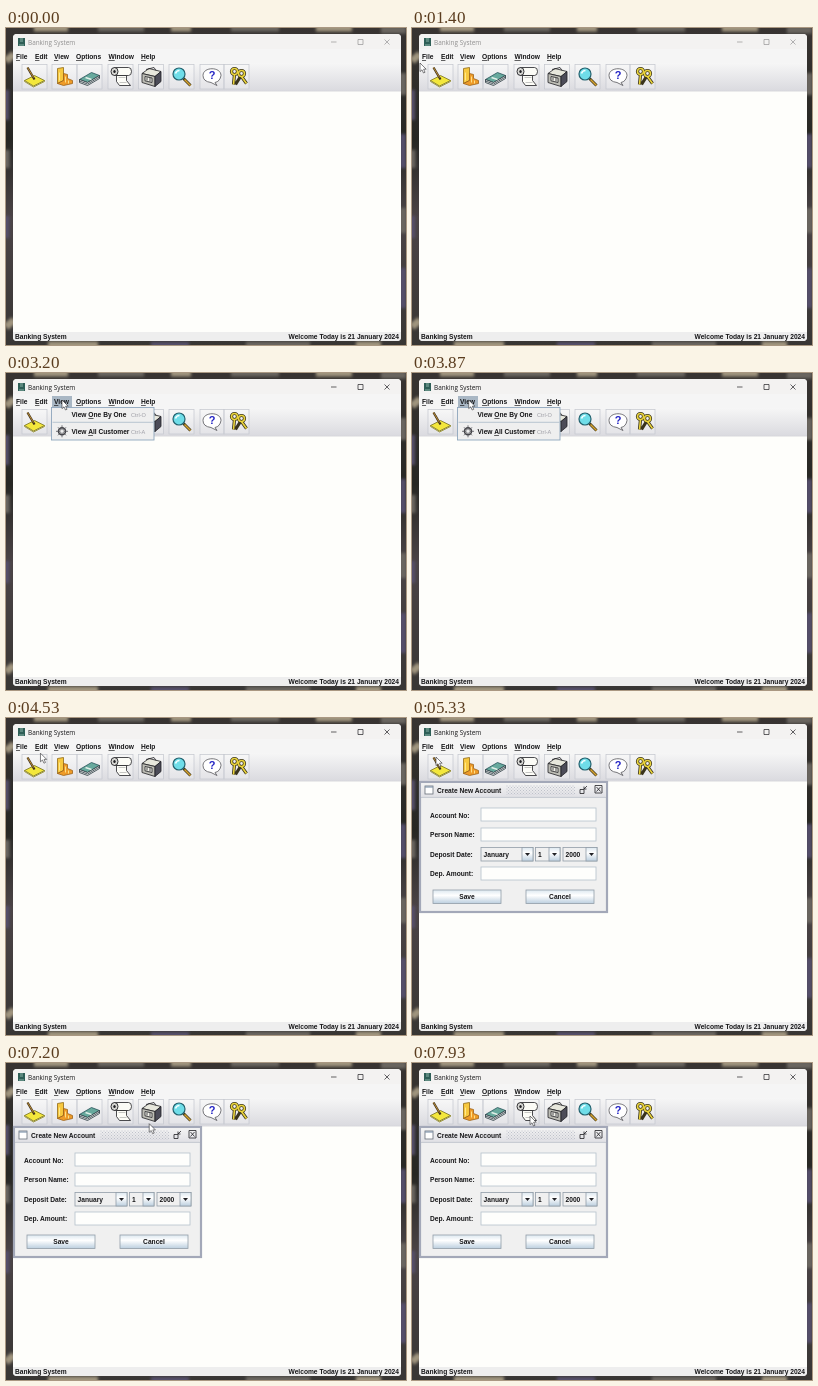
These frames come from a looping animation (400 by 317 pixels, 8 s). An HTML page:

```html
<!DOCTYPE html>
<html lang="en">
<head>
<meta charset="utf-8">
<title>Banking System</title>
<style>
html, body { margin: 0; width: 100%; height: 100%; overflow: hidden; background: #2f2d2c; }
svg { display: block; width: 100%; height: 100%; }
text { font: bold 6.65px "Liberation Sans", Arial, sans-serif; fill: #161618; white-space: pre; }
.cap { font: 6.4px "Open Sans", "Noto Sans", sans-serif; }
.key { font-weight: normal; font-size: 5.6px; fill: #9c9ca4; }
.u { text-decoration: underline; text-decoration-thickness: .6px; }
</style>
</head>
<body>
<svg id="stage" viewBox="0 0 400 317">
  <defs>
    <linearGradient id="bar" x2="0" y2="1">
      <stop stop-color="#f6f6f6"/><stop offset="1" stop-color="#dadadf"/>
    </linearGradient>
    <linearGradient id="btn" x2="0" y2="1">
      <stop stop-color="#dde8f0"/><stop offset=".4" stop-color="#fff"/><stop offset="1" stop-color="#bccfdf"/>
    </linearGradient>
    <linearGradient id="calm" x2="0" y2="1">
      <stop stop-color="#f3f3f3"/><stop offset="1" stop-color="#e0e0e5"/>
    </linearGradient>
    <linearGradient id="lively" x2="0" y2="1">
      <stop stop-color="#f0f4fb"/><stop offset="1" stop-color="#cbdaec"/>
    </linearGradient>
    <linearGradient id="wall" x2="0" y2="1">
      <stop stop-color="#383432"/><stop offset=".35" stop-color="#272723"/>
      <stop offset=".6" stop-color="#4b4446"/><stop offset="1" stop-color="#383634"/>
    </linearGradient>
    <pattern id="bumps" width="3" height="3" patternUnits="userSpaceOnUse">
      <path d="M0 .5h1M1.5 2h1" stroke="#b4b8c2" stroke-width=".8"/>
    </pattern>
    <filter id="soft"><feGaussianBlur stdDeviation="1.5"/></filter>
  </defs>
  <rect width="400" height="317" fill="url(#wall)"/>
  <g id="desk" filter="url(#soft)"></g>
  <g id="app"></g>
  <g id="dialog"></g>
  <g id="edit"></g>
  <g id="view"></g>
  <path id="mouse" d="M0 0V8.6L2 6.8 3.5 10 5 9.3 3.6 6.2H6.2Z" fill="#fff" stroke="#2e2e32" stroke-width=".6"/>
</svg>
<script>
const LOOP = 8000;
const INK = "#202024", EDGE = "#929da9";
const $ = id => document.getElementById(id);
const rect = (x, y, w, h, fill, stroke = "none", more = "") =>
  `<rect x="${x}" y="${y}" width="${w}" height="${h}" fill="${fill}" stroke="${stroke}" ${more}/>`;
const path = (d, stroke = INK, fill = "none", width = .8) =>
  `<path d="${d}" stroke="${stroke}" fill="${fill}" stroke-width="${width}"/>`;
// "_" before a letter underlines it
const text = (x, y, s, more = "") =>
  `<text x="${x}" y="${y}" ${more}>${s.replace(/_(.)/, '<tspan class="u">$1</tspan>')}</text>`;
const at = (x, y, s) => `<g transform="translate(${x} ${y})">${s}</g>`;

// Blurred wallpaper around the window
$("desk").innerHTML =
  path("M28 0H62M165 0H185M310 0H346M0 33 8 26M0 299 8 292M42 317H92M350 317H375", "#a0957f", "none", 7) +
  path("M92 0H138M225 0H273M375 2H400M0 122V140M397 45V67M397 180V205M240 317H304", "#6b6660", "none", 7) +
  path("M0 62V92M0 188V210M397 106V140M397 240V280M145 317H183", "#55506a", "none", 6);

// Toolbar pictures, drawn around their own centre
const icons = [
  [28.5, path("M-10 4 0-1 10 4-1 9.5Z", "#77701c", "#f3e73c") + path("M-10 4v1L-1 10.5 10 5V4", "#8d861b") +
    path("M-7-9 0 3", "#3f301c", "none", 2.2) + path("M-7-9-1 1", "#dda63a")],
  [58.5, path("M-7-8-1-9V4L-7 7Z", "#916a17", "#f7c83f") + path("M-1-3 3-2V2L8 4V7L-1 9-7 7-1 4Z", "#9d6218", "#ee9b28") +
    path("M-5-4v8M1 0v6M4 4v3", "#fff0a0")],
  [83.5, path("M-10 3 2-4 10-1-2 6Z", "#27545a", "#67a99d") + path("M-10 3V6L-2 9 10 2V-1L-2 6Z", "#24343c", "#f4f4ee") +
    path("M-10 4.5-2 7.5 10 .5", "#2a3a48") + path("M-4 1 2 3", "#e0efe8", "none", 1.6)],
  [114.5, path("M-6-9H8Q11-9 11-5Q11-1 8-1H-6Z", INK, "#fbfbf6") + path("M-4-1V5L-1 9H10L6 4V-1Z", INK, "#fdfdf8") +
    `<ellipse cx="-6" cy="-5" rx="3.5" ry="4" fill="#d8d8d4" stroke="${INK}" stroke-width=".9"/>` +
    `<ellipse cx="-6" cy="-5" rx="1.2" ry="1.6" fill="${INK}"/>` + path("M-2 1H5M-1 6H6", "#b9b9b6")],
  [145, path("M-9-3-2-8 10-5 4 0Z", INK, "#e7e7dc") + path("M-9-3 4 0V10L-9 6Z", INK, "#bdbdb5") +
    path("M4 0 10-5V5L4 10Z", INK, "#4c4c58") + path("M-6 0 1 1.5V6L-6 4.3Z", INK, "#f4f4ec") +
    path("M-4 1V4M-1 1.5V5M-5-7 3-9 5-6", INK)],
  [175.5, path("M2 2 9 9", "#453b1c", "none", 3) + path("M3 3 9 9", "#d9a52e", "none", 1.4) +
    '<circle cx="-2.5" cy="-2.5" r="6" fill="#6fdde8" stroke="#22616e" stroke-width="1.2"/>' +
    path("M-6-3Q-5-6-2-6", "#f2ffff", "none", 1.6)],
  [206, path("M-1 6Q-9 5-9-1C-9-10 9-10 9-1Q8 5 3 6L5 9Z", "#55555a", "#fff") +
    text(0, 2.5, "?", 'text-anchor="middle" style="font-size:11px;fill:#2424c4"')],
  [231.5, '<g fill="none" stroke="#3a341c" stroke-width="3.2"><circle cx="-3" cy="-5" r="3"/><circle cx="4" cy="-3" r="3"/><path d="M-3-2-4 8M3 0-2 8M4 0 9 7"/></g>' +
    '<g fill="none" stroke="#ead43c" stroke-width="1.6"><circle cx="-3" cy="-5" r="3"/><circle cx="4" cy="-3" r="3"/><path d="M-3-2-4 8M4 0 9 7"/></g>']
];
const buttons = [[16, 25], [46, 25], [71, 25], [102, 25], [132.5, 25], [163, 25], [194, 24], [218, 25]];
const menus = [[10, "_File"], [29, "_Edit"], [48, "_View"], [70, "_Options"], [102.5, "_Window"], [135, "_Help"]];

$("app").innerHTML =
  rect(7, 6, 388, 307, "#fefefb", "none", 'rx="4"') +
  path("M7 21V10Q7 6 11 6H391Q395 6 395 10V21Z", "none", "#f3f2f1") +
  rect(7, 21, 388, 14, "#f5f5f5") +
  rect(7, 35, 388, 28, "url(#bar)") +
  path("M7 63.2H395", "#cfcfd4", "none", .6) +
  rect(12, 10, 7, 8, "#2f5f57") + path("M14 11h3M14 13h3M13 17h5", "#a2c8bb") +
  '<g id="caption">' + text(22, 16.7, "Banking System", 'class="cap"') +
  `<path d="M325 14h5.5M352 11.5h5v5h-5ZM378.5 11.5l5 5m0-5-5 5" fill="none" stroke="${INK}" stroke-width=".7"/></g>` +
  rect(26, 23, 19, 11.5, "#a9b7c4", "none", 'id="editTab"') +
  rect(46, 23, 20, 11.5, "#a9b7c4", "none", 'id="viewTab"') +
  menus.map(m => text(m[0], 31, m[1])).join("") +
  buttons.map(([x, w]) => rect(x, 36.5, w, 24.5, "#fff", "#c4c7ce", 'fill-opacity=".2" stroke-width=".7"')).join("") +
  icons.map(([x, s]) => at(x, 48.5, s)).join("") +
  path("M7 304H395V309Q395 313 391 313H11Q7 313 7 309Z", "none", "#eeeeee") +
  text(9, 311, "Banking System") +
  text(393, 311, "Welcome Today is 21 January 2024", 'text-anchor="end"');

function popup(x, y, h, rows, lines) {
  return rect(x, y, 102.5, h, "#efefef", "#8fa6bd", 'stroke-width=".9"') +
    lines.map(l => path(`M${x + 1} ${l}h101`, "#a3b4c5", "none", .7)).join("") +
    rows.map(([row, label, key, kx]) =>
      text(x + 20, row, label) + text(kx, row - .3, key, 'class="key"')).join("");
}
const trash = path("M-3-3H3L2 5H-2ZM-4-4H4M-1-5H1M-1-1V4M1-1V4", "#424246", "#cacacb");
const glasses = path("M-6 5-3-5H-1V4ZM6 5 3-5H1V4ZM-1-1H1", "#1c1c20", "#2a2a2e", 1) +
  path("M-4.5 4-2.5 4M2.5 4 4.5 4", "#a5a5a8");
const gear = '<circle r="3.5" fill="#d9d9d9" stroke="#424246" stroke-width="1.5"/>' +
  path("M-6 0H6M0-6V6M-4-4 4 4M-4 4 4-4", "#525258") + '<circle r="1.5" fill="#efefef"/>';
$("edit").innerHTML = popup(25.5, 34.5, 75.5, [
  [44.2, "Depos_it Money", "Ctrl-T", 102], [56.7, "_Withdraw Money", "Ctrl-W", 102],
  [73, "_Delete Customer", "Ctrl-D", 102.5], [91.5, "_Search By No.", "Ctrl-S", 102],
  [105.5, "Search By Na_me", "Ctrl-M", 102]
], [61.2, 79.5]) + at(36, 70, trash) + at(36, 89, glasses);
$("view").innerHTML = popup(45.5, 34.5, 32.5, [
  [44.2, "View _One By One", "Ctrl-O", 125], [61, "View _All Customer", "Ctrl-A", 125]
], [49.3]) + at(56, 58.3, gear);

const thin = 'stroke-width=".8"';
const field = y => rect(69, y, 115, 13, "#fefefc", "#b5c0cb", thin);
const combo = (x, w, s) => rect(x, 129.5, w, 13.5, "#f0f0f0", EDGE, thin) +
  rect(x + w - 11, 129.5, 11, 13.5, "url(#btn)", EDGE, thin) +
  path(`M${x + w - 8} 135h5l-2.5 3Z`, "none", INK) + text(x + 2.5, 138.7, s);
const push = (x, s) => rect(x, 172, 68, 13.5, "url(#btn)", EDGE, thin) +
  text(x + 34, 181.4, s, 'text-anchor="middle"');
$("dialog").innerHTML =
  rect(8, 64, 187, 130, "#f0f0f0", "none", 'id="frame" stroke-width="2.2"') +
  rect(9.2, 65.2, 184.6, 14, "url(#calm)", "none", 'id="head"') + rect(94, 67, 69, 10, "url(#bumps)") +
  path("M9 79.4H194", "#b3b9c4", "none", .7) +
  rect(13, 68, 8, 8, "#fff", "#666e78", thin) + path("M13 69H21", "#8498ad", "none", 1.2) +
  text(25, 74.6, "Create New Account") +
  path("M168 71.5h4v4h-4ZM175 68l-3 3m0-2.5V71h2.5") +
  path("M183 67.5h7v7.5h-7ZM184.5 69l4 4.5m0-4.5-4 4.5") +
  [[99.5, "Account No:"], [119, "Person Name:"], [138.7, "Deposit Date:"], [158.3, "Dep. Amount:"]]
    .map(([y, s]) => text(18, y, s)).join("") +
  [90, 110, 149].map(field).join("") +
  combo(69, 52, "January") + combo(123.5, 24.5, "1") + combo(151, 34, "2000") +
  push(21, "Save") + push(114, "Cancel") +
  path("M183 92.5v8").replace("<path", '<path id="caret"');

// Pointer stops: time, x, y
const stops = [
  [800, -8, 62], [1250, 8, 35], [1500, 8, 35], [1800, 14, 27], [2050, 30, 26], [2850, 31, 26],
  [3150, 56, 27], [4250, 57, 27], [4700, 24, 39], [5550, 24, 39], [6150, 190, 75],
  [6750, 190, 75], [7500, 118, 53], [8000, 118, 53]
];
function pointer(t) {
  const i = stops.findIndex(s => s[0] > t);
  if (i < 1) return stops[0].slice(1);
  const [a, x, y] = stops[i - 1], [b, p, q] = stops[i];
  const k = (t - a) / (b - a), e = k * k * (3 - 2 * k);
  return [x + (p - x) * e, y + (q - y) * e];
}
const show = (id, on) => $(id).setAttribute("visibility", on ? "visible" : "hidden");

function draw(t) {
  const edit = t >= 2000 && t < 3050, view = t >= 3050 && t < 4500;
  const focus = t >= 5900 && t < 7000;
  $("caption").setAttribute("opacity", t < 1700 ? .45 : 1);
  show("edit", edit);
  show("editTab", edit);
  show("view", view);
  show("viewTab", view);
  show("dialog", t >= 4900);
  show("caret", focus && t % 1000 < 500);
  $("frame").setAttribute("stroke", focus ? "#86a0cf" : "#a3a8b8");
  $("head").setAttribute("fill", focus ? "url(#lively)" : "url(#calm)");
  $("mouse").setAttribute("transform", `translate(${pointer(t).join(" ")})`);
}
const start = performance.now();
function tick() {
  draw((performance.now() - start) % LOOP);
  requestAnimationFrame(tick);
}
tick();
</script>
</body>
</html>
```
